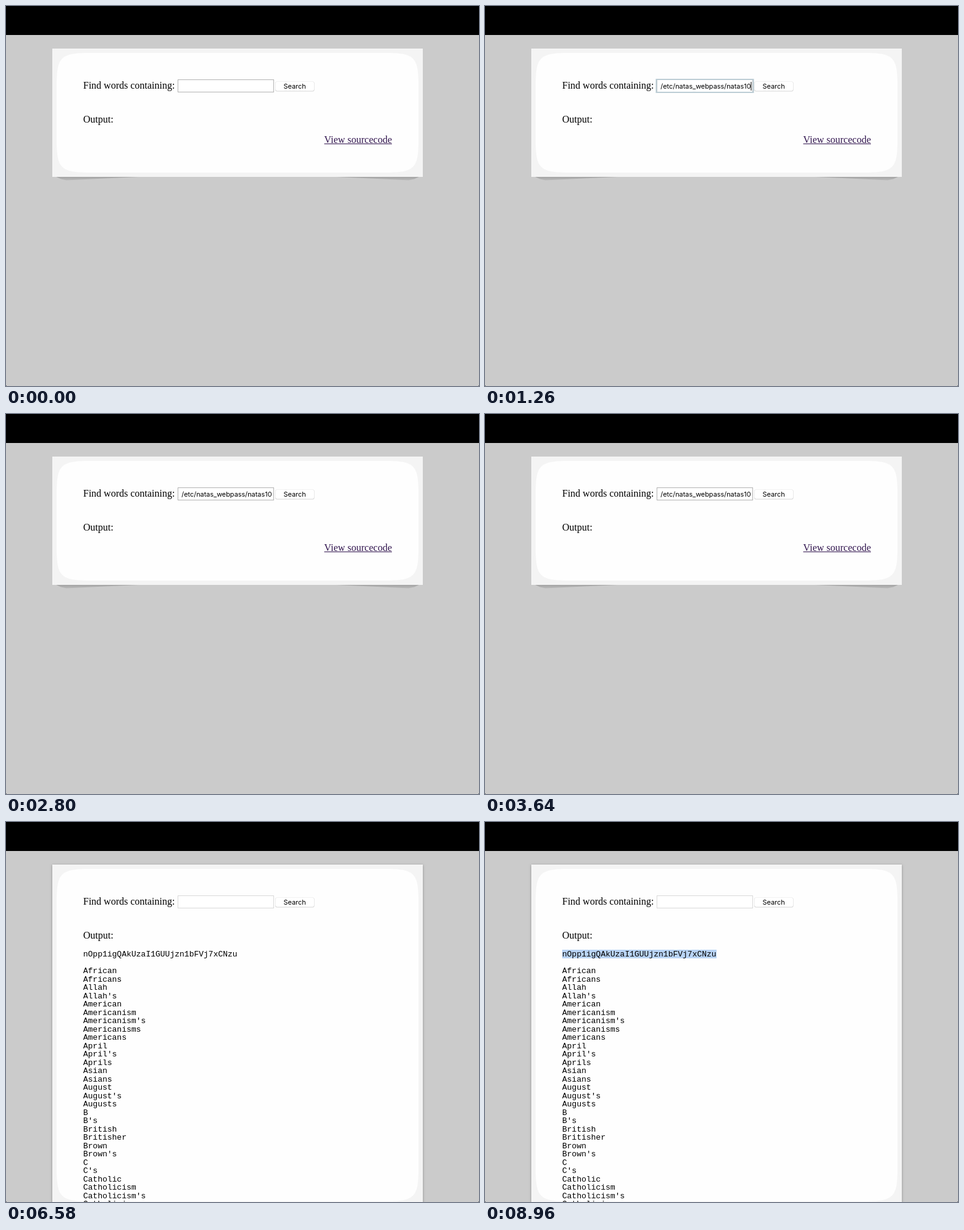
An HTML page with a canvas that plays this animation: 766x616 px, repeating every 9.45 s.

```html
<!DOCTYPE html>
<html lang="en">
<head>
<meta charset="utf-8">
<title>Word search</title>
<style>
  html, body { margin: 0; width: 100%; height: 100%; overflow: hidden; background: #fff; }
  canvas { display: block; width: 766px; height: 616px; }
</style>
</head>
<body>
<canvas id="stage"></canvas>
<script>
const W = 766, H = 616, LOOP = 9450, STEP = 70;
const FOCUS = 280, TYPED = 1190, BLUR = 2380, LEAVE = 3710, RESULT = 6580, SELECT = 8890;

const SERIF = '16px "Liberation Serif", "Times New Roman", serif';
const MONO = '13px "Liberation Mono", "Courier New", monospace';
const UI = '10.9px Inter, Roboto, sans-serif';

const QUERY = '; cat /etc/natas_webpass/natas10';
const SECRET = 'nOpp1igQAkUzaI1GUUjzn1bFVj7xCNzu';
const WORDS = ("African Africans Allah Allah's American Americanism Americanism's " +
  "Americanisms Americans April April's Aprils Asian Asians August August's Augusts " +
  "B B's British Britisher Brown Brown's C C's Catholic Catholicism Catholicism's " +
  "Catholicisms").split(' ');

const canvas = document.getElementById('stage');
const ctx = canvas.getContext('2d');
const dpr = window.devicePixelRatio || 1;
canvas.width = W * dpr;
canvas.height = H * dpr;

function rect(x, y, w, h, color) {
  ctx.fillStyle = color;
  ctx.fillRect(x, y, w, h);
}

function frame(x, y, w, h, color, line = 1) {
  ctx.strokeStyle = color;
  ctx.lineWidth = line;
  ctx.strokeRect(x + line / 2, y + line / 2, w - line, h - line);
}

function text(str, x, y, font, color = '#000') {
  ctx.font = font;
  ctx.fillStyle = color;
  ctx.fillText(str, x, y);
}

// Edge of the white area inside a soft inset shadow: a contour of two blurred edges.
function glow(x, y, w, h) {
  const level = 0.637, n = 24;
  const inset = s => {
    const a = level ** s;
    return 11.75 * Math.log(a / (1 - a));
  };
  const corner = [];
  for (let i = 0; i <= n; i++) {
    const s = 0.02 + 0.96 * i / n;
    corner.push([inset(1 - s), inset(s)]);
  }
  const back = [...corner].reverse();
  ctx.beginPath();
  for (const [a, b] of corner) ctx.lineTo(x + a, y + b);
  for (const [a, b] of back) ctx.lineTo(x + w - a, y + b);
  for (const [a, b] of corner) ctx.lineTo(x + w - a, y + h - b);
  for (const [a, b] of back) ctx.lineTo(x + a, y + h - b);
  ctx.closePath();
  ctx.fillStyle = '#fefefe';
  ctx.fill();
}

// Lifted paper corner, mirrored for the right side.
function curl(x, dir) {
  const shade = ctx.createLinearGradient(0, 276, 0, 283);
  shade.addColorStop(0, '#a0a0a0');
  shade.addColorStop(1, '#bcbcbc');
  ctx.fillStyle = shade;
  ctx.beginPath();
  ctx.moveTo(x, 276);
  ctx.lineTo(x + dir * 10, 280.5);
  ctx.lineTo(x + dir * 19, 282.5);
  ctx.lineTo(x + dir * 70, 280);
  ctx.lineTo(x + dir * 136, 277);
  ctx.lineTo(x + dir * 136, 276);
  ctx.fill();
}

function corners(bottomOnly) {
  for (const x of [0, W - 1]) {
    rect(x, H - 1, 1, 1, '#555');
    if (!bottomOnly) rect(x, 0, 1, 1, '#555');
  }
}

function button() {
  ctx.beginPath();
  ctx.roundRect(436, 122.5, 63.5, 16, 3);
  ctx.fillStyle = '#d4d4d4';
  ctx.fill();
  ctx.beginPath();
  ctx.roundRect(436.5, 122.5, 62.5, 15, 3);
  ctx.fillStyle = '#fff';
  ctx.fill();
  ctx.strokeStyle = '#f0f0f0';
  ctx.lineWidth = 0.5;
  ctx.stroke();
  text('Search', 449.5, 134, UI);
}

function field(value, focused, caret, border) {
  rect(278, 119, 156, 21, '#fff');
  frame(278, 119, 156, 21, border);
  if (focused) frame(276.5, 118, 159, 23, '#bccdd5', 2);

  ctx.save();
  ctx.beginPath();
  ctx.rect(281, 120, 151, 19);
  ctx.clip();
  ctx.font = UI;
  const end = Math.min(281 + ctx.measureText(value).width, 430.5);
  ctx.textAlign = 'right';
  text(value, end, 134, UI);
  if (caret) rect(end, 123, 1, 14, '#000');
  ctx.restore();
}

function page(cardHeight) {
  rect(0, 0, W, H, '#cbcbcb');
  rect(0, 0, W, 47, '#000');
  if (cardHeight > 300) {
    ctx.save();
    ctx.shadowColor = 'rgba(0,0,0,.3)';
    ctx.shadowBlur = 4 * dpr;
    ctx.shadowOffsetY = dpr;
    rect(75, 69, 600, cardHeight, '#f4f4f4');
    ctx.restore();
  } else {
    curl(79, 1);
    curl(671, -1);
    rect(75, 69, 600, cardHeight, '#f4f4f4');
  }
  glow(75, 69, 600, cardHeight);
  text('Find words containing:', 125, 134, SERIF);
  text('Output:', 125, 189, SERIF);
  button();
}

function form(t) {
  page(208);
  const part = Math.min(1, Math.max(0, (t - FOCUS) / (TYPED - FOCUS)));
  const focused = t >= FOCUS && t < BLUR;
  const blinkOn = t < TYPED || Math.floor((t - TYPED) / 500) % 2 === 0;
  field(QUERY.slice(0, Math.round(part * QUERY.length)), focused, focused && blinkOn, '#b4b4b4');

  const link = 'View sourcecode', color = '#32164f';
  ctx.font = SERIF;
  const width = ctx.measureText(link).width;
  text(link, 625 - width, 222, SERIF, color);
  rect(625 - width, 223, width, 1, color);
  corners(true);
}

function results(t) {
  page(553);
  field('', false, false, '#d9d9d9');
  if (t >= SELECT) rect(125, 207, 250, 14, '#b9d4f5');
  text(SECRET, 125, 218, MONO);
  WORDS.forEach((word, i) => text(word, 125, 245 + i * 13.5, MONO));
  corners(true);
}

function blank() {
  rect(0, 0, W, H, '#fefefe');
  rect(0, H - 1, 67, 1, '#cfcfcf');
  corners(false);
}

function draw(now) {
  const t = Math.floor((now % LOOP) / STEP) * STEP;
  ctx.setTransform(dpr, 0, 0, dpr, 0, 0);
  if (t < LEAVE) form(t);
  else if (t < RESULT) blank();
  else results(t);
}

const start = performance.now();
function tick() {
  draw(performance.now() - start);
  requestAnimationFrame(tick);
}
tick();
</script>
</body>
</html>
```
